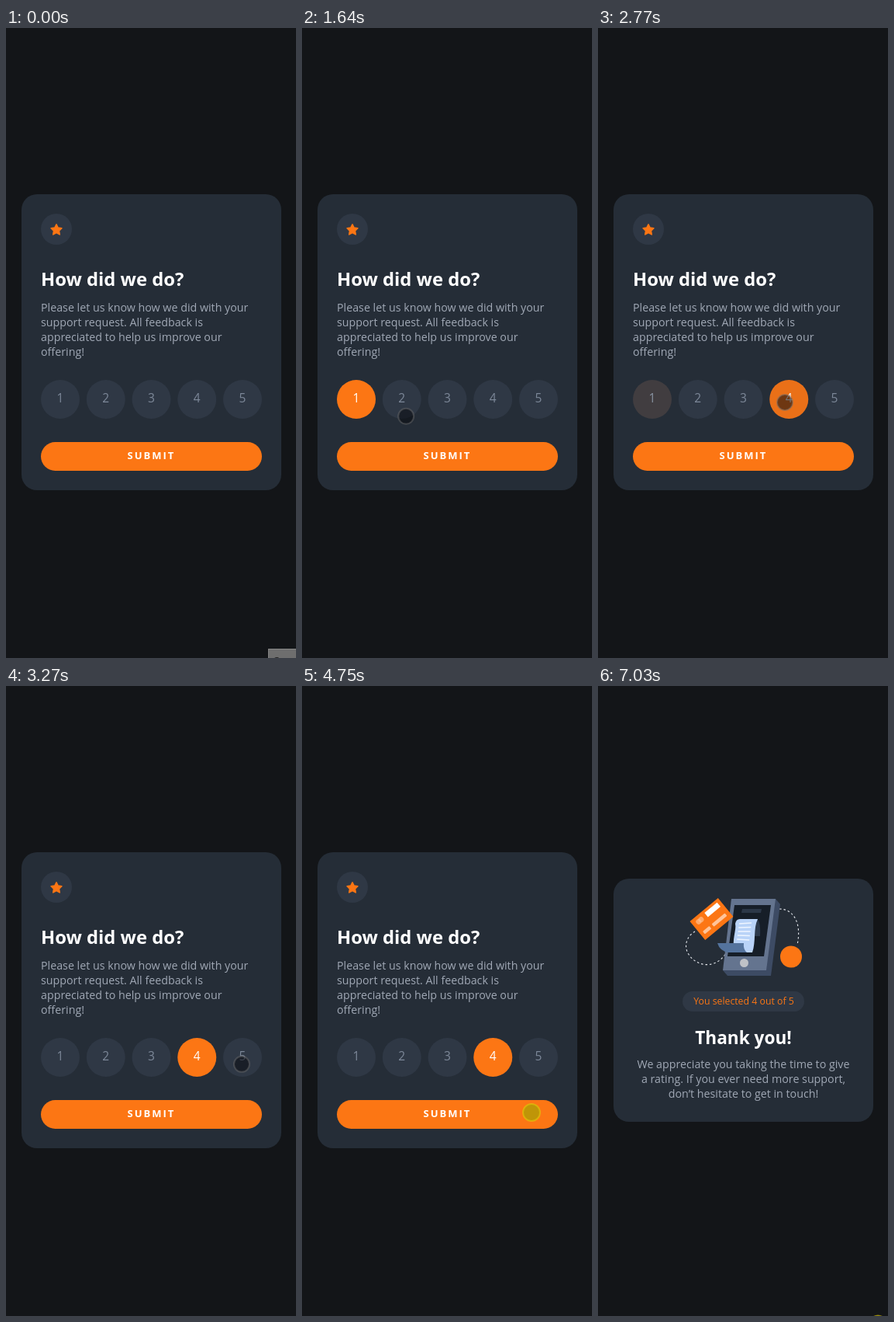
Recreate the animation shown at these times as an HTML page. Size 374 px wide and 811 px high, loop 7100 ms.

```html
<!DOCTYPE html>
<html lang="en">
<head>
<meta charset="utf-8">
<title>Rating card</title>
<style>
  html, body { margin: 0; width: 100%; height: 100%; overflow: hidden; background: #131518; }
  svg { display: block; width: 374px; height: 811px; font-family: "Open Sans", "Noto Sans", sans-serif; }
  .card { fill: #252d37; }
  .chip { fill: #2f3845; }
  .accent { fill: #fc7614; }
  .title { fill: #fff; font-weight: 700; }
  .body { fill: #a0a8b5; font-size: 14.25px; }
  .digit { fill: #7d8899; font-size: 15.5px; text-anchor: middle; }
  .on .digit { fill: #fff; }
  .mid { text-anchor: middle; }
  .dots { fill: none; stroke: #e8ebf0; stroke-width: 1.1; stroke-dasharray: 2.5 3; }
</style>
</head>
<body>
<svg viewBox="0 0 374 811">
  <g id="form">
    <rect class="card" x="20" y="214" width="335" height="381" rx="20"/>
    <circle class="chip" cx="65" cy="259" r="20"/>
    <polygon id="star" class="accent" stroke="#fc7614" stroke-width="1.6" stroke-linejoin="round"/>
    <text class="title" x="45" y="332" font-size="23.8">How did we do?</text>
    <text class="body" id="question"></text>
    <g id="ratings"></g>
    <rect class="accent" x="45" y="533" width="285" height="37" rx="18.5"/>
    <text class="title" x="156.5" y="555" font-size="13" letter-spacing="2">SUBMIT</text>
  </g>

  <g id="thanks">
    <rect class="card" x="20" y="248" width="335" height="313" rx="20"/>
    <path class="dots" d="M125 316C113 323 110 337 118 347C130 363 153 363 165 344"/>
    <path class="dots" d="M234 287C252 287 263 305 257 333"/>
    <path fill="#3d4b64" d="M229 274L235 281L223 373H167L161 366Z"/>
    <path fill="#64748f" d="M172 274H229L217 366H161Z"/>
    <path fill="#161e28" d="M176 282H223L214 348H167Z"/>
    <path fill="#2c3848" d="M186 287H211L210 292H185Z"/>
    <circle cx="188.5" cy="356.5" r="5.5" fill="#bfc2c7"/>
    <path fill="#2c394b" d="M204 300Q210 301 209 322H200Z"/>
    <path fill="#b9d3f8" d="M183 300H206C200 312 204 329 199 343H176C172 326 179 314 177 306Q178 300 183 300Z"/>
    <path id="print" fill="none" stroke="#eef5ff" stroke-width="1.3"/>
    <path fill="#54739d" d="M154 331H188Q187 339 192 343H168Q157 341 154 331Z"/>
    <g transform="translate(146.5 300) rotate(-39.5)">
      <rect class="accent" x="-23.5" y="-15.5" width="47" height="31"/>
      <rect x="-2" y="-12" width="21" height="7" fill="#fff"/>
      <g fill="#ffc499">
        <circle cx="-15" cy="-8" r="3.5" opacity=".65"/>
        <circle cx="-11" cy="-8" r="3.5" opacity=".65"/>
        <rect x="-19" y="5" width="11" height="4.5" rx="1"/>
        <rect x="-4" y="5" width="22" height="4.5" rx="1"/>
      </g>
    </g>
    <circle class="accent" cx="249" cy="348.5" r="14"/>
    <rect class="chip" x="109" y="393" width="157" height="26" rx="13"/>
    <text class="accent mid" x="188" y="409.5" font-size="12.3">You selected 4 out of 5</text>
    <text class="title mid" x="187.5" y="460.5" font-size="22.6">Thank you!</text>
    <text class="body mid" id="reply"></text>
  </g>

  <circle id="cursor" stroke-width="2"/>
  <g id="tooltip">
    <rect x="338.5" y="799.5" width="60" height="30" fill="#6e6e6e" stroke="#858585"/>
    <text x="344" y="819" font-size="13" fill="#222">Copy</text>
  </g>
</svg>

<script>
const LOOP = 7100, PRESS = 130;
const CLICKS = { one: 1150, four: 2430, submit: 4750, corner: 7030 };
const CORNER = [361, 821.5], ONE = [76, 470], FOUR = [241, 482], SUBMIT = [286, 559], REST = [296, 549];

const smooth = p => p * p * (3 - 2 * p);
const easeOut = p => 1 - (1 - p) ** 2;

// Each move bends from one resting point to the next around a control point.
const moves = [
  { start: 0, end: 1010, from: CORNER, bend: [112, 590], to: ONE, ease: smooth },
  { start: 1500, end: 2200, from: ONE, bend: [155, 531], to: FOUR, ease: easeOut },
  { start: 2980, end: 3750, from: FOUR, bend: [375, 475], to: SUBMIT, ease: smooth },
  { start: 4100, end: 4490, from: SUBMIT, bend: [313, 484], to: REST, ease: smooth },
  { start: 6230, end: 6640, from: REST, bend: [315, 455], to: [400, 800], ease: smooth },
  { start: CLICKS.corner, end: LOOP, from: CORNER, bend: CORNER, to: CORNER, ease: smooth }
];

const $ = id => document.getElementById(id);
const show = (id, visible) => $(id).style.display = visible ? '' : 'none';
const progress = (t, start, end) => Math.min(1, Math.max(0, (t - start) / (end - start)));

function setLines(id, x, y, lines) {
  $(id).innerHTML = lines.map((line, i) => `<tspan x="${x}" y="${y + 19 * i}">${line}</tspan>`).join('');
}

function buildScene() {
  setLines('question', 45, 365, ['Please let us know how we did with your',
    'support request. All feedback is', 'appreciated to help us improve our', 'offering!']);
  setLines('reply', 187.5, 492, ['We appreciate you taking the time to give',
    'a rating. If you ever need more support,', 'don’t hesitate to get in touch!']);

  $('star').setAttribute('points', Array.from({ length: 10 }, (_, i) => {
    const radius = i % 2 ? 3.6 : 7.2, angle = (i / 5 - 0.5) * Math.PI;
    return [65 + radius * Math.cos(angle), 260 + radius * Math.sin(angle)];
  }).join(' '));

  $('print').setAttribute('d', Array.from({ length: 5 }, (_, i) =>
    `M${182 - i * 0.7} ${306 + 5 * i}l16 ${i / 2 - 1}`).join(''));

  $('ratings').innerHTML = Array.from({ length: 5 }, (_, i) => {
    const x = 70 + 58.75 * i;
    const button = color => `<circle class="${color}" cx="${x}" cy="478" r="25"/>
      <text class="digit" x="${x}" y="482">${i + 1}</text>`;
    return `${button('chip')}<g class="on" id="on${i + 1}" opacity="0">${button('accent')}</g>`;
  }).join('');
}

function cursorAt(t) {
  const { start, end, from, bend, to, ease } = moves.findLast(move => move.start <= t);
  const u = ease(progress(t, start, end)), v = 1 - u;
  return from.map((a, i) => v * v * a + 2 * u * v * bend[i] + u * u * to[i]);
}

function draw(t) {
  const submitted = t >= CLICKS.submit + PRESS;
  show('form', !submitted);
  show('thanks', submitted);
  show('tooltip', t < 70);

  const selected = click => easeOut(progress(t, click + PRESS, click + PRESS + 300));
  const four = selected(CLICKS.four);
  $('on1').setAttribute('opacity', selected(CLICKS.one) * (1 - four));
  $('on4').setAttribute('opacity', four);

  const pressed = Object.values(CLICKS).some(click => t >= click && t < click + PRESS);
  const [cx, cy] = cursorAt(t);
  const look = pressed
    ? { r: 11, fill: 'rgba(150,170,0,.6)', stroke: 'rgba(225,200,10,.6)' }
    : { r: 10, fill: 'rgba(8,10,14,.55)', stroke: 'rgba(110,110,110,.45)' };
  for (const [name, value] of Object.entries({ cx, cy, ...look })) $('cursor').setAttribute(name, value);
}

buildScene();
const startTime = performance.now();
function tick() {
  draw(Math.max(0, performance.now() - startTime) % LOOP);
  requestAnimationFrame(tick);
}
tick();
</script>
</body>
</html>
```
